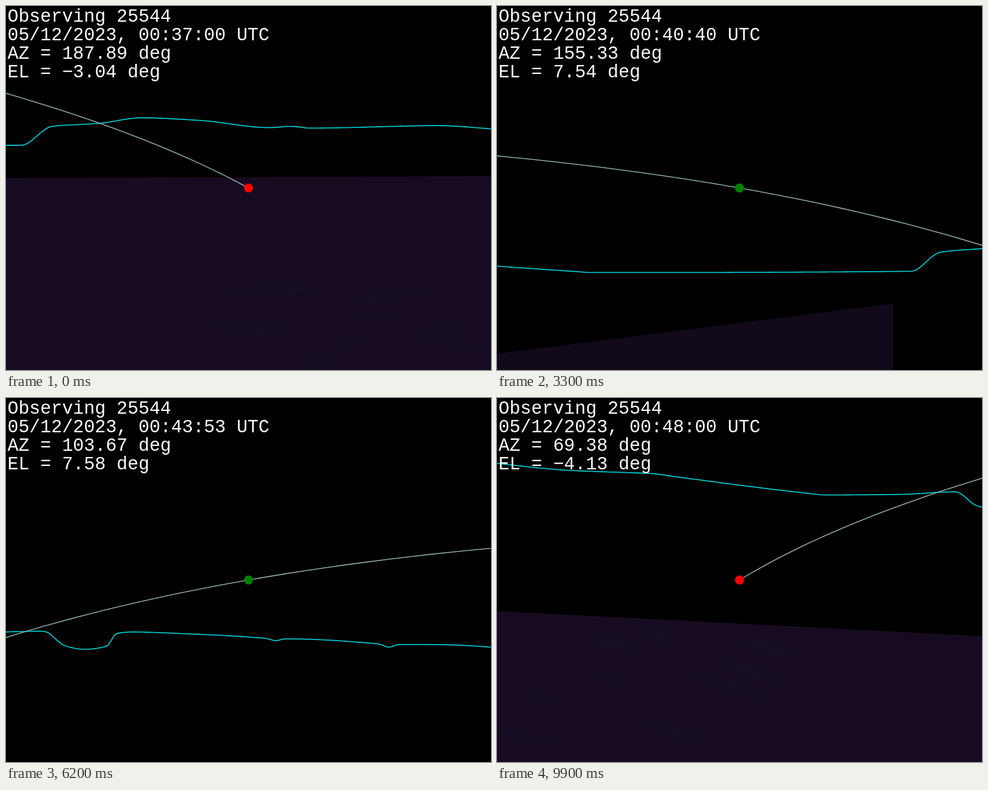
Write an HTML page with a canvas that moves like this. It is 864 px wide and 648 px high and loops after 10000 ms.

```html
<!DOCTYPE html>
<html lang="en">
<head>
<meta charset="utf-8">
<title>Satellite pass</title>
<style>
html, body { margin: 0; height: 100%; overflow: hidden; background: #000; }
canvas { display: block; }
</style>
</head>
<body>
<canvas id="stage" width="864" height="648"></canvas>
<script>
const ctx = document.getElementById('stage').getContext('2d');
const W = 864, H = 648, STEPS = 100;
const RAD = Math.PI / 180;
const FOCAL = H / 2 / Math.tan(15 * RAD); // 30 degree vertical field of view
const ALTITUDE = 0.066; // orbit height in Earth radii

// Vectors are east, north, up
function direction(az, el) {
  const c = Math.cos(el * RAD);
  return [c * Math.sin(az * RAD), c * Math.cos(az * RAD), Math.sin(el * RAD)];
}

// Observed fixes: step, azimuth, elevation
const fixes = [
  [0, 187.89, -3.04], [10, 181.29, 0.13], [33, 155.33, 7.54], [50, 124.69, 9.69],
  [73, 89.06, 4.19], [85, 77.97, 0.23], [99, 69.38, -4.13]
].map(([step, az, el]) => {
  const s = Math.sin(el * RAD);
  const range = Math.sqrt(s * s + 2 * ALTITUDE + ALTITUDE ** 2) - s;
  return { step, pos: direction(az, el).map(v => v * range) };
});

// Lagrange interpolation of the position between fixes
function satellite(step) {
  const pos = [0, 0, 0];
  for (const a of fixes) {
    let weight = 1;
    for (const b of fixes) if (a !== b) weight *= (step - b.step) / (a.step - b.step);
    a.pos.forEach((v, i) => pos[i] += v * weight);
  }
  return pos;
}

function project([e, n, u], { az, el }) {
  const side = e * Math.cos(az) - n * Math.sin(az);
  const ahead = e * Math.sin(az) + n * Math.cos(az);
  const depth = ahead * Math.cos(el) + u * Math.sin(el);
  const rise = u * Math.cos(el) - ahead * Math.sin(el);
  return [W / 2 + FOCAL * side / depth, H / 2 - FOCAL * rise / depth, depth];
}

// Key points of the skyline: azimuth, elevation
const ridge = [
  [49, 5.36], [55.5, 4.89], [62, 4.74], [64, 4.5], [75, 3.14], [76.6, 2.98], [82.3, 2.97],
  [86.9, 3.12], [88.6, 1.98], [90.1, 1.7], [91.9, 1.96], [92.7, 3.02], [94, 3.16], [98.6, 3.03],
  [105.1, 2.67], [106, 2.47], [106.7, 2.62], [114.5, 2.16], [115.3, 1.89], [116.1, 2.1],
  [119.7, 2.05], [125, 1.68], [141.5, 0.54], [143.2, 0.44], [169.4, 0.53], [171.8, 2.06],
  [175.6, 2.35], [179, 2.83], [184, 2.62], [189.6, 2.04], [191.5, 2.14], [193.1, 1.99],
  [203.2, 2.13], [208, 1.79]
];

const slope = i => (ridge[i + 1][1] - ridge[i][1]) / (ridge[i + 1][0] - ridge[i][0]);

function tangent(i) {
  const a = slope(Math.max(0, i - 1)), b = slope(Math.min(ridge.length - 2, i));
  return a * b > 0 ? 2 * a * b / (a + b) : 0;
}

// Monotone cubic through the key points
function skylineAt(az) {
  let i = 0;
  while (i < ridge.length - 2 && az > ridge[i + 1][0]) i++;
  const [x0, y0] = ridge[i], [x1, y1] = ridge[i + 1];
  const d = x1 - x0, t = (az - x0) / d, s = 1 - t;
  return s * s * ((1 + 2 * t) * y0 + t * d * tangent(i)) +
         t * t * ((1 + 2 * s) * y1 - s * d * tangent(i + 1));
}

const skyline = Array.from({ length: 637 }, (_, i) => 49 + i / 4).map(az => direction(az, skylineAt(az)));
const track = Array.from({ length: STEPS }, (_, i) => satellite(i));

// Rim of the ground, in units of eye height
const rim = [[-60, -25.2], [5.8, -27.1], [6.8, -7], [6.86, 14]].map(([e, n]) => [e, n, -1]);

let seed = 11;
const random = (min, max) => {
  seed = seed * 16807 % 2147483647;
  return min + (max - min) * seed / 2147483647;
};

// Faint patches scattered over one sector of the ground
const scatter = (azMin, azMax, elMin, elMax, tilt) => Array.from({ length: 12 }, () => ({
  dir: direction(random(azMin, azMax), random(elMin, elMax)),
  w: random(40, 110), h: random(7, 22), tilt
}));
const patches = [...scatter(186, 207, -18, -10, -0.07), ...scatter(51, 72, -17, -8, 0.25)];

const visible = (points, cam) => points.map(p => project(p, cam)).filter(p => p[2] > 0.02);

function drawLine(points, cam, color, width) {
  ctx.beginPath();
  for (const [x, y] of visible(points, cam)) ctx.lineTo(x, y);
  ctx.strokeStyle = color;
  ctx.lineWidth = width;
  ctx.stroke();
}

function drawPatch({ dir, w, h, tilt }, cam) {
  const [x, y, depth] = project(dir, cam);
  if (depth < 0.5) return;
  ctx.save();
  ctx.translate(x, y);
  ctx.rotate(tilt);
  ctx.scale(w, h);
  const glow = ctx.createRadialGradient(0, 0, 0, 0, 0, 1);
  glow.addColorStop(0, 'rgba(18,22,36,0.35)');
  glow.addColorStop(1, 'rgba(18,22,36,0)');
  ctx.fillStyle = glow;
  ctx.fillRect(-1, -1, 2, 2);
  ctx.restore();
}

function drawGround(cam) {
  const edge = visible(rim, cam);
  if (edge.length < 2) return;
  const light = Math.min(1, Math.max(0, -cam.el / RAD / 3));
  ctx.save();
  ctx.beginPath();
  for (const [x, y] of edge) ctx.lineTo(x, y);
  ctx.lineTo(edge[edge.length - 1][0], 9000);
  ctx.lineTo(edge[0][0], 9000);
  ctx.closePath();
  ctx.fillStyle = `rgb(${18 + 4 * light},${10 + light},${27 + 5 * light})`;
  ctx.fill();
  ctx.clip();
  patches.forEach(p => drawPatch(p, cam));
  ctx.restore();
}

function drawText(step, az, el) {
  const seconds = Math.floor(37 * 60 + step * 20 / 3);
  const two = n => String(n).padStart(2, '0');
  const degrees = v => v.toFixed(2).replace('-', '\u2212') + ' deg';
  ctx.font = '32.4px "Courier New", "Liberation Mono", monospace';
  ctx.fillStyle = '#fff';
  [
    'Observing 25544',
    `05/12/2023, 00:${two(Math.floor(seconds / 60))}:${two(seconds % 60)} UTC`,
    'AZ = ' + degrees(az),
    'EL = ' + degrees(el)
  ].forEach((line, i) => ctx.fillText(line, 2.7, 27.5 + 33 * i));
}

function draw(step) {
  const [e, n, u] = satellite(step);
  const cam = { az: Math.atan2(e, n), el: Math.atan2(u, Math.hypot(e, n)) };
  const az = (cam.az / RAD + 360) % 360, el = cam.el / RAD;
  ctx.fillStyle = '#000';
  ctx.fillRect(0, 0, W, H);
  drawGround(cam);
  drawLine(skyline, cam, '#00ced1', 1.8);
  drawLine(track, cam, '#94b0b2', 1.6);
  ctx.beginPath();
  ctx.arc(W / 2, H / 2, 8, 0, 2 * Math.PI);
  ctx.fillStyle = el > skylineAt(az) ? '#008000' : '#f00';
  ctx.fill();
  drawText(step, az, el);
}

ctx.lineJoin = 'round';
const start = performance.now();
function tick() {
  draw(Math.floor((performance.now() - start) / 100) % STEPS);
  requestAnimationFrame(tick);
}
tick();
</script>
</body>
</html>
```
